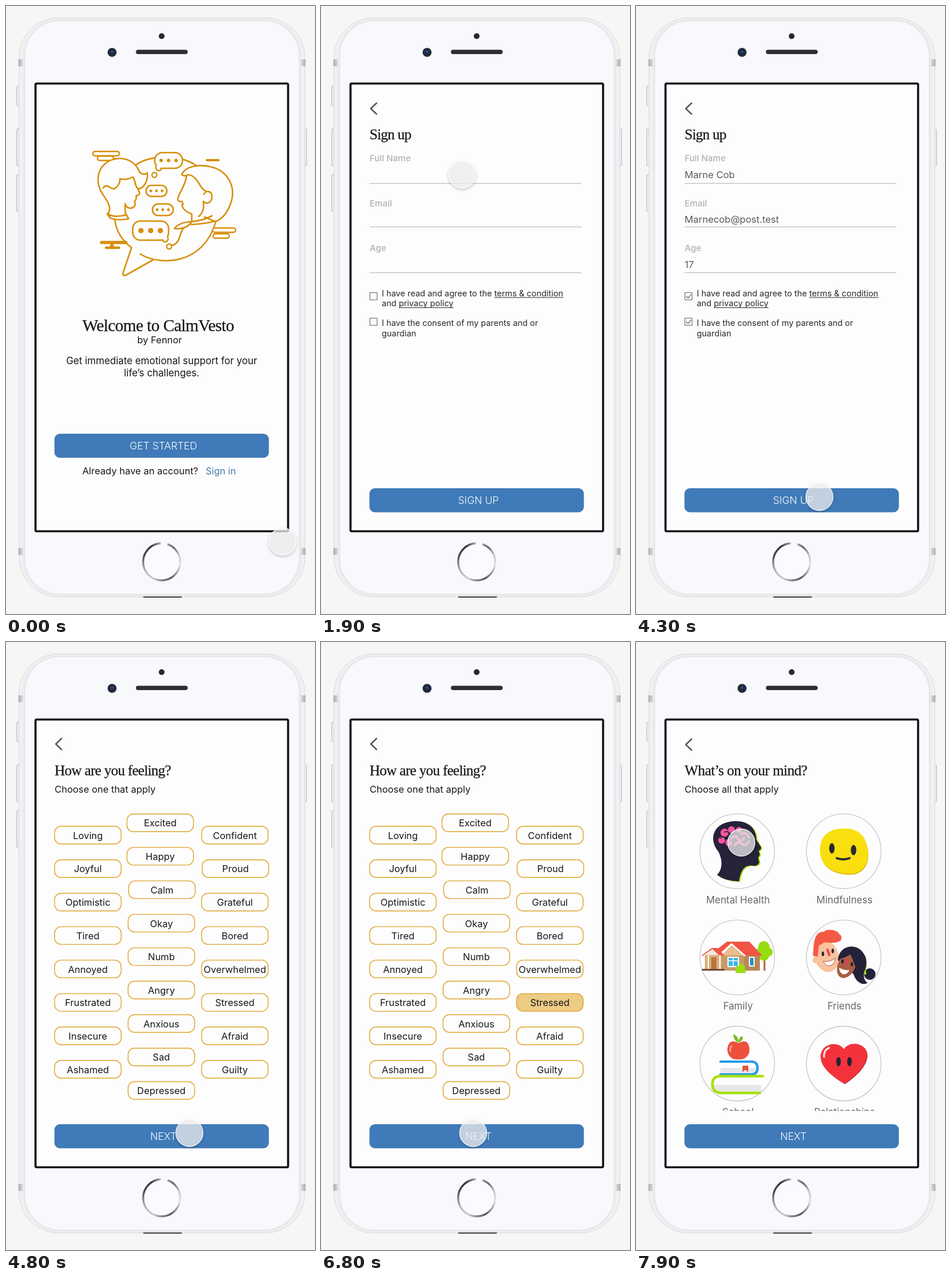
Write an HTML page with a canvas that moves like this. It is 534 px wide and 1049 px high and loops after 8 s.

```html
<!DOCTYPE html>
<html lang="en">
<head>
<meta charset="utf-8">
<title>Sign-up walkthrough</title>
<style>
html, body { margin: 0; width: 100%; height: 100%; overflow: hidden; background: #f7f6f5; }
canvas { display: block; width: 534px; height: 1049px; }
</style>
</head>
<body>
<canvas id="stage" width="534" height="1049"></canvas>
<script>
const ctx = document.getElementById('stage').getContext('2d');
const LOOP = 8000, STEP = 100;
const SANS = 'Inter, "Liberation Sans", sans-serif';
const SERIF = '"Liberation Serif", "Noto Serif", serif';
const BLUE = '#407ab8', AMBER = '#d68f0b', INK = '#17161a', WHITE = '#fefdfe';

// ---------- drawing helpers ----------
function paint(path, fill, stroke, width = 1) {
  if (fill) { ctx.fillStyle = fill; ctx.fill(path); }
  if (stroke) { ctx.strokeStyle = stroke; ctx.lineWidth = width; ctx.stroke(path); }
}
const shape = (d, fill, stroke, width) => paint(new Path2D(d), fill, stroke, width);
function box(x, y, w, h, r, fill, stroke, width) {
  const p = new Path2D();
  p.roundRect(x, y, w, h, r);
  paint(p, fill, stroke, width);
}
function oval(x, y, rx, ry, fill, stroke, width, turn = 0) {
  const p = new Path2D();
  p.ellipse(x, y, rx, ry, turn, 0, Math.PI * 2);
  paint(p, fill, stroke, width);
}
const disc = (x, y, r, fill, stroke, width) => oval(x, y, r, r, fill, stroke, width);
function text(str, x, y, { size = 16.4, color = INK, align = 'left', weight = 400, family = SANS, gap = 0 } = {}) {
  ctx.font = `${weight} ${size}px ${family}`;
  ctx.letterSpacing = gap + 'px';
  ctx.textAlign = align;
  ctx.fillStyle = color;
  ctx.fillText(str, x, y);
  return ctx.measureText(str).width;
}
function heading(str, x, y, { size = 25, gap = -0.75, align = 'left' } = {}) {
  text(str, x, y, { size, gap, align, family: SERIF });
  ctx.strokeStyle = INK;
  ctx.lineWidth = 0.25;
  ctx.strokeText(str, x, y);
}
function linkText(str, x, y, opts) {
  const w = text(str, x, y, opts);
  ctx.fillRect(x, y + 2, w, 1);
}
function button(label, y) {
  box(83.7, y, 370.6, 41.6, 9.5, BLUE);
  text(label, 272, y + 27, { size: 17.4, weight: 300, color: '#fafcfe', align: 'center' });
}
const backArrow = y => shape(`M96 ${y - 9.5} L86 ${y} L96 ${y + 9.5}`, null, '#58575b', 2.5);

// ---------- device ----------
function drawPhone() {
  ctx.fillStyle = '#f7f6f5';
  ctx.fillRect(0, 0, 534, 1049);
  for (const [x, y, h] of [[18.5, 138, 34], [18.5, 212, 64], [18.5, 291, 64], [513.5, 212, 64]])
    box(x, y, 6, h, 2, '#ececee', '#b9b8bc', 1);

  box(22.5, 20.5, 494, 999, 68, '#f1f1f3', '#d9d8dc', 1);
  ctx.save();
  ctx.shadowColor = 'rgba(120,120,130,.22)';
  ctx.shadowBlur = 6;
  box(33, 26, 473, 988, 60, '#f7f9fd');
  ctx.restore();
  for (const y of [92, 935]) {
    for (const x of [21.5, 509.5]) {
      const g = ctx.createLinearGradient(x, 0, x + 8, 0);
      g.addColorStop(x < 100 ? 0 : 1, '#a9a9ac');
      g.addColorStop(x < 100 ? 1 : 0, '#e0e0e3');
      box(x, y, 8, 12, 0, g);
    }
  }
  box(237, 1018.5, 67, 2.5, 1, '#58585c');

  disc(269, 52, 5, '#29282e');
  box(224.5, 75.5, 89.5, 7.5, 3.7, '#2d2d33');
  disc(183.3, 80, 7.8, '#292a32');
  disc(183.3, 80, 4.6, '#182b4c');
  disc(183.3, 79, 1.8, '#2d629f');

  const ring = ctx.createConicGradient(-Math.PI / 2, 269, 959);
  [[0, '#f4f5f7'], [0.05, '#999'], [0.11, '#666'], [0.19, '#c8c8ca'], [0.28, '#e2e2e4'], [0.36, '#999'], [0.42, '#555'],
   [0.5, '#888'], [0.57, '#ccc'], [0.66, '#bbb'], [0.74, '#888'], [0.81, '#444'], [0.9, '#333'], [0.98, '#999'], [1, '#f4f5f7']]
    .forEach(([at, color]) => ring.addColorStop(at, color));
  disc(269, 959, 32, '#fafbfe', ring, 3.4);
  shape('M271 927 Q274 927 277 928', null, '#f8f9fc', 5);

  box(51, 133.8, 436.5, 772.5, 2, WHITE, '#111014', 3.6);
}

// ---------- welcome page ----------
function chatBubble(x, y, w, h, dotR, tail) {
  if (tail) disc(tail[0], tail[1], 5, WHITE, AMBER, 2.6);
  box(x, y, w, h, Math.min(h / 2, 13), WHITE, AMBER, 2.6);
  if (tail) disc(tail[0], tail[1] - 1.5, 3.7, WHITE);
  for (let i = -1; i < 2; i++) disc(x + w / 2 + i * w * 0.27, y + h / 2, dotR, AMBER);
}
function drawCouple() {
  const line = (d, fill, width = 2.6) => shape(d, fill, AMBER, width);
  line('M222 276 C247 257 298 254 330 276');
  line('M188 368 C190 389 202 406 217 417 L202 461 Q202 467 208 464 L254 438');
  line('M232 428 C265 448 341 449 363 371');

  for (const [x, y, w] of [[150, 251, 46], [158, 259, 28], [357, 383, 40], [358, 393, 28]])
    box(x, y, w, 7.5, 3.7, WHITE, AMBER, 2.4);
  line('M165 408 H207', null, 5.5);
  line('M173 417 H195', null, 4.5);
  line('M183 410 V416', null, 6);
  line('M347 266 H367', null, 4);

  // left figure
  line('M175 359 Q182 353 177 341 C172 329 159 319 159 299 C159 279 175 263 197 263 C213 263 226 273 231 287 Q239 293 244 288 C246 301 238 316 228 315 C222 311 224 299 219 295', WHITE);
  line('M168 314 C175 304 181 318 188 315 Q197 309 197 298 Q209 301 219 295');
  line('M228 315 L231 323 Q230 327 225 327 Q226 334 222 337 Q226 347 215 349 Q207 348 206 341 Q205 352 207 360');
  line('M175 359 Q190 366 208 360 L212 367 Q195 371 180 366Z');

  // right figure
  line('M304 291 C310 274 339 274 352 277 C386 284 398 315 388 341 C383 356 374 367 362 372 L343 364', WHITE);
  line('M304 291 Q309 295 314 291 C331 291 336 318 345 319');
  line('M312 293 C310 312 295 328 297 334 Q298 338 304 337 L306 342 L304 344 Q307 354 321 359 V372');
  line('M342 325 C345 317 357 319 356 330 C355 340 346 343 341 337 C343 353 337 360 333 363');
  line('M291 384 Q299 373 321 372 Q312 386 291 384Z');
  line('M321 372 Q341 370 356 362 M320 377 Q343 376 362 371');
  line('M308 382 C298 391 303 410 286 413');
  disc(282, 415, 4.3, WHITE, AMBER, 2.4);

  chatBubble(257, 253, 48, 27, 3, [264, 279]);
  chatBubble(242, 309.5, 36, 19, 2.4);
  chatBubble(253, 341.5, 36, 20, 2.4);
  chatBubble(219, 371, 62, 33, 4.6, [275, 402]);
  disc(256.5, 291.5, 4.2, WHITE, AMBER, 2.4);
}
function welcomePage() {
  drawCouple();
  const center = { align: 'center' };
  heading('Welcome to CalmVesto', 263, 561, { size: 29, gap: -0.55, align: 'center' });
  text('by Fennor', 265.5, 582, center);
  text('Get immediate emotional support for your', 269, 617.5, { size: 16.8, align: 'center' });
  text('life’s challenges.', 269, 638.5, { size: 16.8, align: 'center' });
  button('GET STARTED', 738);
  text('Already have an account?', 132, 808);
  text('Sign in', 345, 808, { color: '#417bad' });
}

// ---------- sign-up page ----------
const FIELDS = [
  { label: 'Full Name', value: 'Marne Cob', y: 268, rule: 306, at: 2100 },
  { label: 'Email', value: 'Marnecob@post.test', y: 345.5, rule: 381, at: 2400 },
  { label: 'Age', value: '17', y: 423, rule: 460, at: 2600 },
];
function checkbox(y, on) {
  box(84.5, y, 12.5, 12.5, 0, null, '#646368', 1.1);
  if (on) shape(`M87 ${y + 6.5} l3 3 l5 -6`, null, '#646368', 1.2);
}
function signUpPage(t) {
  backArrow(177);
  heading('Sign up', 84, 230);
  for (const f of FIELDS) {
    text(f.label, 84, f.y, { size: 14.9, weight: 600, color: '#bab9be' });
    if (t >= f.at) text(f.value, 84, f.y + 28.5, { size: 16.5, color: '#5a595e' });
    ctx.fillStyle = '#bfbec2';
    ctx.fillRect(84, f.rule - 0.5, 366, 1.3);
  }
  checkbox(494.5, t >= 3000);
  checkbox(538.5, t >= 3800);
  const small = { size: 14.4, color: '#28272b' };
  const lead = text('I have read and agree to the ', 105, 500.5, small);
  linkText('terms & condition', 105 + lead, 500.5, small);
  const and = text('and ', 105, 518, small);
  linkText('privacy policy', 105 + and, 518, small);
  text('I have the consent of my parents and or', 105, 552, small);
  text('guardian', 105, 569.5, small);
  button('SIGN UP', 832);
}

// ---------- feelings page ----------
const FEELINGS = [
  [84, 318, 'Loving Joyful Optimistic Tired Annoyed Frustrated Insecure Ashamed'],
  [211, 296.7, 'Excited Happy Calm Okay Numb Angry Anxious Sad Depressed'],
  [338, 318, 'Confident Proud Grateful Bored Overwhelmed Stressed Afraid Guilty'],
];
const NUDGE = { Excited: -2, Happy: -2, Calm: 1, Proud: 1 };
function feelingsPage(t) {
  backArrow(176);
  heading('How are you feeling?', 84, 230);
  text('Choose one that apply', 84, 260);
  for (const [left, top, words] of FEELINGS) {
    words.split(' ').forEach((word, i) => {
      const x = left + (NUDGE[word] || 0), y = top + i * 57.72;
      const picked = word === 'Stressed' && t >= 6000;
      box(x, y, 115, 30.5, 11, picked ? '#eccb85' : WHITE, '#dea42b', 1.4);
      text(word, x + 57.5, y + 21.7, { align: 'center' });
    });
  }
  button('NEXT', 832);
}

// ---------- topics page ----------
function mindIcon() {
  const head = 'M140 402 C151 391 149 374 142 361 C125 341 132 310 172 309 C198 309 208 325 208 341 L216 354 Q217 358 212 360 L214 367 L211 372 L213 380 Q211 387 202 386 C187 384 181 394 178 413 Q155 413 140 402Z';
  ctx.save();
  ctx.translate(2, 1);
  shape(head, '#a6e50b');
  ctx.restore();
  shape(head, '#252239');
  for (const [x, y, r] of [[148, 342, 6], [153, 329, 7], [165, 324, 6], [178, 324, 5], [160, 346, 6]])
    disc(x, y, r, '#f4559f');
  shape('M165 339 q7 -8 11 0 t11 -1 M171 350 q6 -8 12 -2 t12 -4 M182 331 q8 -4 13 6', null, '#f4559f', 4);
  shape('M145 339 q7 -6 9 1 M153 328 q7 -3 8 4 M161 346 q1 -7 8 -5', null, '#252239', 1.6);
}
function smileIcon() {
  const face = 'M318 359 C318 330 340 320 364 322 C389 323 400 340 401 365 C401 390 386 401 366 400 C340 399 318 386 318 359Z';
  ctx.save();
  ctx.translate(0.5, 1.5);
  shape(face, '#d7ac11');
  ctx.restore();
  shape(face, '#f9df0e');
  oval(338.5, 356, 4.7, 9, '#2a2832');
  oval(376, 359, 4.7, 9, '#2a2832');
  shape('M347 373 Q358 377 369 373', null, '#2a2832', 3.8);
}
function houseIcon() {
  box(220.5, 540, 3, 27, 0, '#a56a3c');
  for (const [x, y, r] of [[221, 526, 10], [214, 535, 7.5], [229, 535, 7.5], [221, 541, 9]]) disc(x, y, r, '#98dc12');
  box(119, 540, 29, 25, 0, '#dcae7c');
  box(148, 540, 66, 27, 0, '#c89a69');
  box(187, 540, 27, 27, 0, '#b78857');
  shape('M148 541 L165 523 L187 541Z', '#e8bd8e');
  shape('M139 531 L157 517 H196 L218 541 H188 L165 521 L146 536Z', '#f15444');
  shape('M145 540 L165 521 L188 541', null, '#fff', 2.6);
  shape('M113 541 L131 528 H141 L153 541 H143 L132 530 L116 542Z', '#f15444');
  shape('M117 540 L132 530 L143 540Z', '#f4e9e2');
  box(159, 544, 18, 16, 0, '#39b7e5', '#fff', 2);
  box(196, 544, 8, 15, 0, '#278fc4', '#fff', 2);
  shape('M168 544 V560 M159 550 H177', null, '#fff', 1.5);
  box(130, 544, 9, 21, 0, '#b9733e');
  shape('M117 541 V565 M125 541 V565 M145 541 V565', null, '#fff', 2);
  box(114, 564, 39, 3, 0, '#704a35');
  shape('M172 571 V561 Q175 557 178 560 Q180 549 185 557 Q189 558 188 563 L190 571Z', '#9bdd12');
}
function friendsIcon() {
  oval(329, 542, 21, 28, '#fac39d', null, 0, -0.3);
  shape('M306 541 C307 518 308 499 325 500 C330 493 350 498 351 504 Q357 506 354 515 Q345 521 326 518 L316 524 L314 543Z', '#f35a45');
  disc(310, 549, 5, '#fac39d');
  oval(323, 538, 2.2, 4, '#2d2935');
  oval(340, 533, 2.2, 4, '#2d2935');
  shape('M331 531 l3 9', null, '#e24858', 4);
  shape('M324 551 Q335 553 345 545 Q343 558 333 559 Q326 558 324 551Z', '#fff', '#a95345', 1);

  disc(404, 573, 10, '#242238');
  shape('M397 559 q-3 6 -1 13', null, '#a7de19', 4);
  shape('M349 549 C350 525 377 519 390 533 C402 546 399 560 394 570 Q392 582 400 588 C392 594 379 586 376 573Z', '#242238');
  oval(364, 558, 15, 23, '#a95e45', null, 0, 0.45);
  shape('M350 547 C355 531 373 525 382 537 Q386 552 383 568 C376 557 375 545 370 539 Q364 544 350 547Z', '#242238');
  oval(357, 551, 2, 3.5, '#211c27');
  oval(373, 556, 2, 3.5, '#211c27');
  shape('M365 549 l-2 9', null, '#d9435a', 4);
  shape('M351 562 Q360 567 369 566 Q364 575 357 573 Q351 569 351 562Z', '#fff');
}
function schoolIcon() {
  shape('M176 691 Q169 687 168 677 Q177 679 177 690 Q178 681 184 680 Q187 687 177 691Z', '#75bf23');
  shape('M177 692 Q194 683 196 702 C197 714 187 722 177 720 C165 722 157 712 158 701 Q161 683 177 692Z', '#ed513d');
  shape('M165 697 q-3 4 -2 9', null, '#ffb0a0', 2.5);
  box(146, 735, 62, 10, [0, 0, 9, 0], '#e6e7eb');
  shape('M146 724 H201 Q210 725 210 735 Q210 745 201 746 H146', null, '#259be8', 4.2);
  shape('M184 731 h10 v11 l-5 -4 l-5 4Z', '#e5533d');
  box(134, 764, 82, 13, [0, 0, 0, 11], '#e6e7eb');
  shape('M219 749 H145 Q132 750 132 763 Q132 776 145 778 H214', null, '#a5e20c', 4.6);
}
function heartIcon() {
  const heart = 'M359 703 C350 687 319 692 319 716 C319 735 343 752 360 762 C376 752 399 732 399 713 C399 691 368 687 359 703Z';
  ctx.save();
  ctx.translate(1, 0.8);
  shape(heart, '#af2630');
  ctx.restore();
  shape(heart, '#f3323c');
  shape('M325 716 Q324 704 334 700', null, '#ffe2e0', 3);
  oval(350, 724, 4, 8, '#2b2430');
  oval(369, 724, 4, 8, '#2b2430');
}
const TOPICS = [
  ['Mental Health', mindIcon], ['Mindfulness', smileIcon], ['Family', houseIcon],
  ['Friends', friendsIcon], ['School', schoolIcon], ['Relationships', heartIcon],
];
function topicsPage() {
  backArrow(177);
  heading('What’s on your mind?', 84, 230, { gap: -0.55 });
  text('Choose all that apply', 84, 260);
  ctx.save();
  ctx.beginPath();
  ctx.rect(60, 280, 420, 529);
  ctx.clip();
  TOPICS.forEach(([label, icon], i) => {
    const x = i % 2 ? 359 : 175, y = 361 + 183.2 * Math.floor(i / 2);
    disc(x, y, 64.5, WHITE, '#bcbbc0', 1.1);
    icon();
    text(label, x + 1.3, y + 90, { color: '#67666b', align: 'center', size: 16.8 });
  });
  ctx.restore();
  button('NEXT', 832);
}

// ---------- timeline ----------
const PAGES = [[7300, topicsPage], [4500, feelingsPage], [1300, signUpPage], [0, welcomePage]];
const PATH = [
  [100, 478, 924], [900, 349, 758], [1300, 349, 758], [1850, 244, 291], [2050, 244, 291],
  [2350, 215, 366], [2550, 150, 443], [2850, 91, 501], [3300, 91, 501], [3600, 91, 545],
  [3850, 91, 545], [4300, 317, 847], [4900, 317, 847], [5650, 395, 622], [6200, 395, 622],
  [6700, 263, 847], [7200, 263, 847], [7800, 182, 346],
];
const ease = k => k * k * (3 - 2 * k);
function touchAt(t) {
  const next = PATH.findIndex(p => p[0] > t);
  if (next === 0) return PATH[0].slice(1);
  if (next < 0) return PATH[PATH.length - 1].slice(1);
  const [t0, x0, y0] = PATH[next - 1], [t1, x1, y1] = PATH[next];
  const k = ease((t - t0) / (t1 - t0));
  return [x0 + (x1 - x0) * k, y0 + (y1 - y0) * k];
}
function drawTouch([x, y]) {
  // the shadow is clipped to the outside so the disc stays clear
  ctx.save();
  ctx.beginPath();
  ctx.rect(0, 0, 534, 1049);
  ctx.arc(x, y, 24, 0, Math.PI * 2);
  ctx.clip('evenodd');
  ctx.shadowColor = 'rgba(0,0,0,.28)';
  ctx.shadowBlur = 5;
  ctx.shadowOffsetY = 2;
  disc(x, y, 23.5, '#fff');
  ctx.restore();
  disc(x, y, 23.5, 'rgba(236,236,236,.76)', 'rgba(255,255,255,.8)', 1.4);
}
function frame() {
  const t = Math.floor((performance.now() % LOOP) / STEP) * STEP;
  ctx.lineCap = ctx.lineJoin = 'round';
  drawPhone();
  PAGES.find(([from]) => t >= from)[1](t);
  drawTouch(touchAt(t));
  requestAnimationFrame(frame);
}
frame();
</script>
</body>
</html>
```
